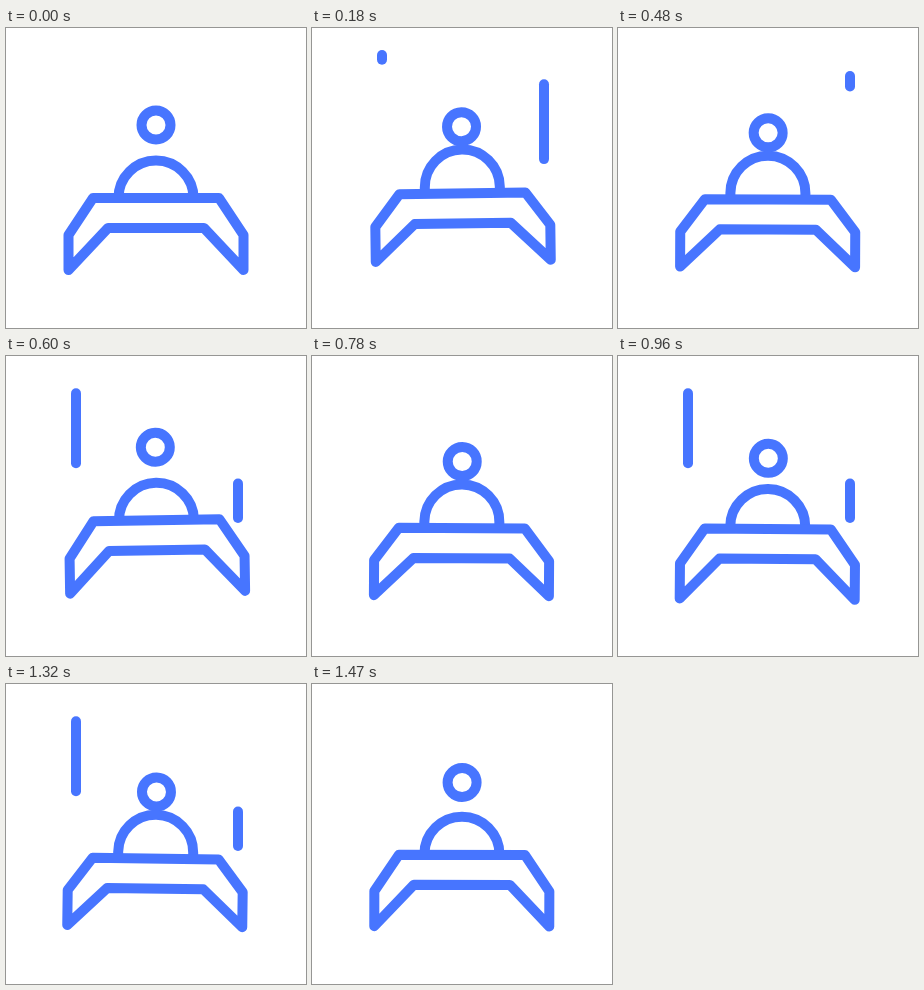
An HTML page for the animation above (1.5 s loop, 300x300 px).

```html
<!DOCTYPE html>
<html lang="en">
<head>
<meta charset="utf-8">
<title>Bumpy ride</title>
<style>
  html, body { margin: 0; width: 100%; height: 100%; overflow: hidden; background: #fff; }
  svg { display: block; width: 100vw; height: 100vh; }
  svg * { fill: none; stroke: #4775ff; stroke-width: 10; stroke-linejoin: round; }
  line { stroke-linecap: round; }
</style>
</head>
<body>
<svg viewBox="0 0 300 300">
  <line id="left" x1="70" x2="70"/>
  <line id="right" x1="232" x2="232"/>
  <g id="ride">
    <circle id="head" cx="150" cy="97" r="14.5"/>
    <path id="body" d="M112.5 174V170A37.5 37.5 0 0 1 187.5 170V174"/>
    <path id="wings"/>
  </g>
</svg>
<script>
  const LOOP = 1500, STEP = 30, GUST = 360, BOB = 300;
  const $ = id => document.getElementById(id);
  const ride = $('ride'), head = $('head'), body = $('body'), wings = $('wings');

  // Vertical sway: [time, offset]
  const sway = [[0, 0], [125, -6], [375, 6], [625, -6], [875, 6], [1125, -6], [1375, 6], [1500, 0]];

  // Each streak runs from top to bottom; its front leads its tail
  const streaks = [
    { el: $('left'), top: 27, bottom: 157, front: 164, tail: 216 },
    { el: $('right'), top: 48, bottom: 162, front: 94, tail: 157 }
  ];
  const RUN = 132;

  const ease = x => (1 - Math.cos(Math.PI * Math.min(1, Math.max(0, x)))) / 2;

  function swayAt(t) {
    const i = sway.findIndex(k => k[0] > t);
    const [t0, a] = sway[i - 1], [t1, b] = sway[i];
    return a + (b - a) * ease((t - t0) / (t1 - t0));
  }

  function drawStreak(s, u) {
    const at = start => s.top + (s.bottom - s.top) * ease((u - start) / RUN);
    const y1 = at(s.tail), y2 = at(s.front);
    s.el.setAttribute('y1', y1);
    s.el.setAttribute('y2', y2);
    s.el.style.display = y2 - y1 > 0.05 ? '' : 'none';
  }

  // The outer edges flap upwards while the middle stays put
  function wingPath(flap) {
    const upper = 207 - flap, tip = 242 - flap;
    return `M87 170H213L237.5 ${upper}V${tip}L198 200H102L62.5 ${tip}V${upper}Z`;
  }

  function draw(t) {
    const y = swayAt(t);
    const bob = (1 - Math.cos(2 * Math.PI * t / BOB)) / 2;
    ride.setAttribute('transform', `translate(0 ${y}) rotate(${y * 0.16} 150 140)`);
    head.setAttribute('transform', `translate(0 ${7 * bob})`);
    body.setAttribute('transform', `translate(0 ${-7 * bob})`);
    wings.setAttribute('d', wingPath(5 * bob));
    streaks.forEach(s => drawStreak(s, t % GUST));
  }

  const start = performance.now();
  function tick() {
    const t = (performance.now() - start) % LOOP;
    draw(Math.floor(t / STEP) * STEP);
    requestAnimationFrame(tick);
  }
  tick();
</script>
</body>
</html>
```
